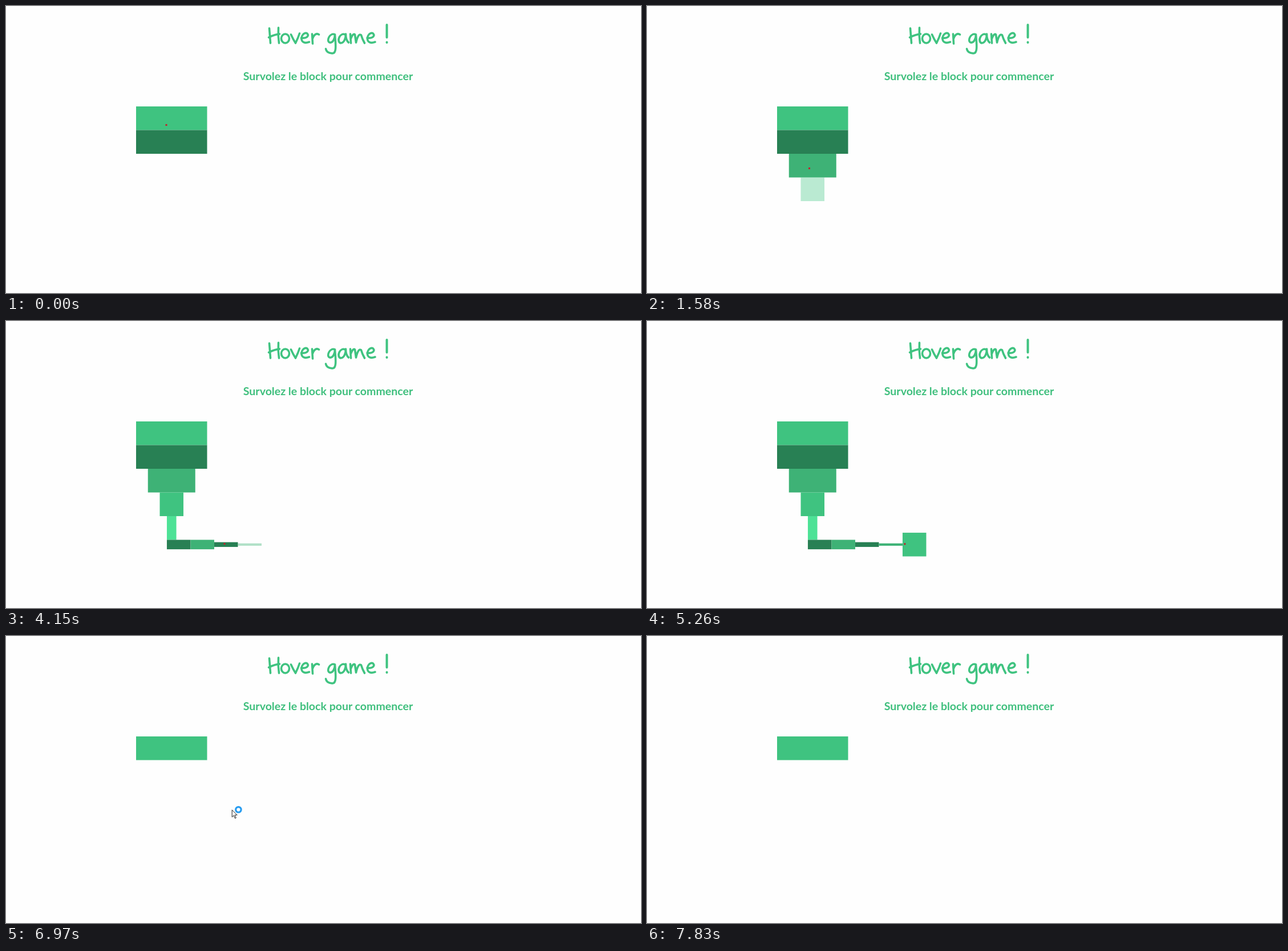
An HTML page for the animation above (8580 ms loop, 1113 px wide and 503 px high).

```html
<!DOCTYPE html>
<html lang="fr">
<head>
<meta charset="utf-8">
<title>Hover game !</title>
<style>
  html, body { margin: 0; width: 100%; height: 100%; overflow: hidden; background: #fefefe; }
  svg { display: block; width: 1113px; height: 503px; }
  #title { fill: none; stroke: #3fc380; stroke-width: 3.6; stroke-linecap: round; stroke-linejoin: round; }
  #hint { font: bold 19.55px Lato, sans-serif; fill: #3fbf7d; text-anchor: middle; }
</style>
</head>
<body>
<svg viewBox="0 0 1113 503">
  <g id="title" role="img" aria-label="Hover game !" transform="translate(.5 0)">
    <path d="M461 39L463 65M460 55Q470 50 479 49M477 38Q476 52 478 65"/>
    <ellipse cx="489" cy="57" rx="7" ry="8"/>
    <path d="M499 50Q503 59 507 65Q511 57 514 48"/>
    <path id="e" d="M517 56Q528 57 529 51Q527 45 521 49C514 56 517 68 531 63"/>
    <path d="M536 49L537 66M537 57Q541 46 548 50"/>
    <path d="M576 50C567 46 560 62 567 64C573 65 576 56 576 50C577 65 580 84 571 83Q561 82 560 75"/>
    <path d="M594 50C585 46 578 62 586 65C592 65 595 57 595 49Q595 60 600 64"/>
    <path d="M603 49L604 65M604 57Q608 47 611 50L613 64Q617 47 622 51Q624 58 628 65"/>
    <use href="#e" x="115.5"/>
    <path d="M667 33V55M667 64V63.5" stroke-width="4"/>
  </g>
  <text id="hint" x="564.5" y="130">Survolez le block pour commencer</text>
  <g id="blocks"></g>
  <rect id="dot" x="-1.5" y="-1.5" width="3" height="3" fill="#c4202c"/>
  <g id="arrow">
    <path d="M.5 .5V13L3.5 10.2 5.7 15.3 7.6 14.5 5.4 9.5H9.5Z" fill="#fff" stroke="#222"/>
    <circle id="ring" cx="11.7" cy="0" r="4.7" fill="none" stroke="#279cf0" stroke-width="3.2"/>
  </g>
</svg>
<script>
const LOOP = 8580, FADE = 450, LEAVE = 5620, GONE = 6000, BUSY = 6780, EXIT = 7830;
const LIGHT = '#3fc380', DARK = '#288054', MID = '#3eb276', PALE = '#4de296';
const UNIT = 41.5, LEFT = 228, TOP = 176;

// Key points: time, x, y
const dotPath = [
  [0, 281, 208.5], [1430, 283, 259.5], [1580, 284.5, 284.5], [1820, 286, 291.5],
  [2730, 291.5, 383.5], [3970, 365, 391], [4150, 383, 390.5],
  [4430, 390.5, 390.5], [4760, 401.5, 390.5], [5600, 486, 391]
];
const arrowPath = [
  [LEAVE, 490, 391], [5800, 519, 394], [GONE, 496.5, 392], [6600, 496.5, 392],
  [6970, 396.5, 304.5], [7120, 276, 276], [7440, 651, 330], [7600, 511, 252], [EXIT, 1114, 465]
];

const $ = id => document.getElementById(id);
const clamp = v => Math.min(1, Math.max(0, v));

function pointAt(path, t) {
  const i = path.findIndex(p => p[0] > t);
  if (i < 1) return path.at(i).slice(1);
  const [t0, x0, y0] = path[i - 1], [t1, x1, y1] = path[i];
  const k = (t - t0) / (t1 - t0);
  return [x0 + (x1 - x0) * k, y0 + (y1 - y0) * k];
}

// The tower goes down in rows, then the arm goes right in columns; sizes in units.
const blocks = [];
const add = (x, y, width, height, fill) => blocks.push({ x, y, width, height, fill });
const axis = LEFT + 1.5 * UNIT;
[[3, LIGHT], [3, DARK], [2, MID], [1, LIGHT], [.4, PALE]].forEach(([w, fill], i) =>
  add(axis - w * UNIT / 2, TOP + i * UNIT, w * UNIT, UNIT, fill));
const armX = axis - .2 * UNIT, armY = TOP + 5.2 * UNIT;
[[.4, DARK], [.4, MID], [.2, DARK], [.1, MID], [1, LIGHT]].forEach(([h, fill], i) =>
  add(armX + i * UNIT, armY - h * UNIT / 2, UNIT, h * UNIT, fill));

// Each block appears once the dot has entered the one before it.
function entryTime({ x, y, width, height }) {
  for (let t = 0; t < LEAVE; t += 5) {
    const [px, py] = pointAt(dotPath, t);
    if (px >= x && px < x + width && py >= y && py < y + height) return t;
  }
}

blocks.forEach((block, i) => {
  const rect = document.createElementNS('http://www.w3.org/2000/svg', 'rect');
  for (const key in block) rect.setAttribute(key, block[key]);
  $('blocks').append(rect);
  block.el = rect;
  block.start = i > 1 ? entryTime(blocks[i - 1]) : -FADE;
});

function place(el, path, t, visible) {
  el.setAttribute('transform', `translate(${pointAt(path, t)})`);
  el.setAttribute('visibility', visible ? 'visible' : 'hidden');
}

function draw(t) {
  const leaving = clamp((GONE - t) / (GONE - LEAVE));
  blocks.forEach(({ el, start }, i) =>
    el.setAttribute('opacity', i ? clamp((t - start) / FADE) * leaving : 1));
  place($('dot'), dotPath, t, t < LEAVE);
  place($('arrow'), arrowPath, t, t >= LEAVE && t < EXIT);
  $('ring').setAttribute('opacity', t >= BUSY ? 1 : 0);
}

const begin = performance.now();
function tick() {
  draw((performance.now() - begin) % LOOP);
  requestAnimationFrame(tick);
}
tick();
</script>
</body>
</html>
```
